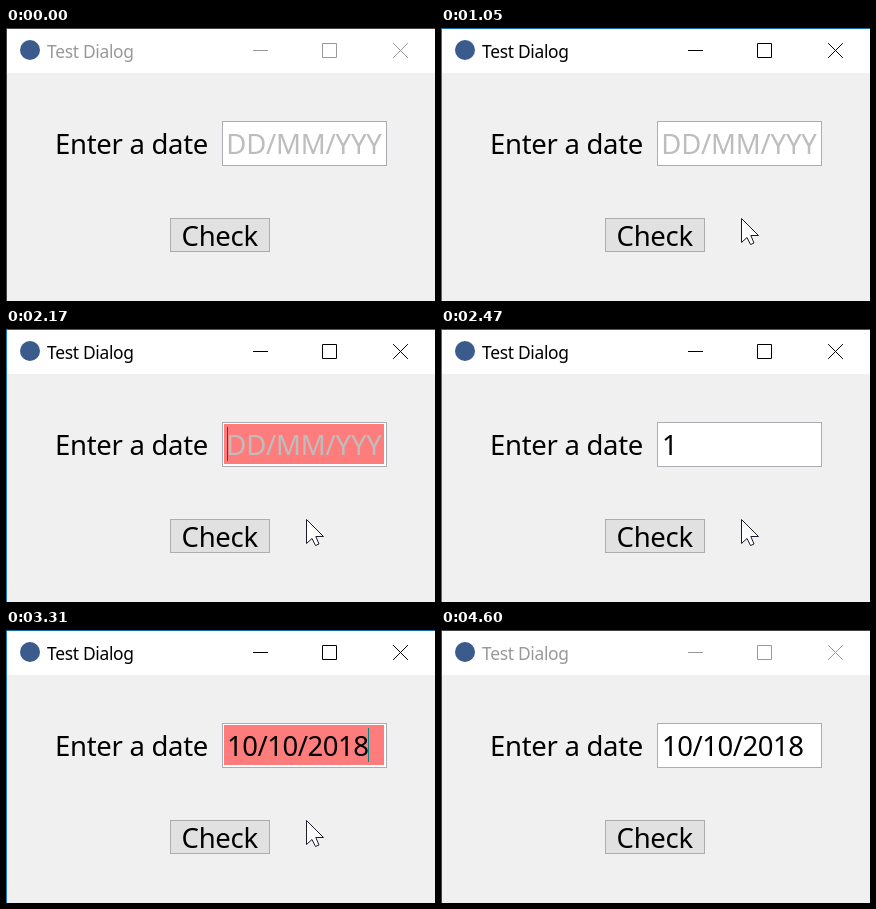
An HTML page that plays this animation: 429x273 px, repeating every 4630 ms.

```html
<!DOCTYPE html>
<html lang="en">
<head>
<meta charset="utf-8">
<title>Test Dialog</title>
<style>
  html, body { margin: 0; width: 100%; height: 100%; overflow: hidden; background: #f0f0f0; }
  svg { display: block; width: 429px; height: 273px; }
  text { font-family: "Noto Sans", "Open Sans", sans-serif; font-size: 27.5px; letter-spacing: -.3px; white-space: pre; }
  .title { font-size: 17.4px; letter-spacing: -.3px; }
  #win { --top: #444; --side: #444; --ink: #999; }
  #win.active { --top: #1766a6; --side: #1a7ac8; --ink: #000; }
  .top { fill: var(--top); }
  .side { fill: var(--side); }
  .title { fill: var(--ink); }
  .buttons { fill: none; stroke: var(--ink); }
  #hint { fill: #bdbdbd; letter-spacing: -.2px; }
  #typed { letter-spacing: -.48px; }
  #typed.word { letter-spacing: -.86px; }
</style>
</head>
<body>
<svg id="win" viewBox="0 0 429 273">
  <rect width="429" height="273" fill="#f0f0f0"/>
  <rect width="429" height="45" fill="#fff"/>
  <rect class="side" width="1" height="273"/>
  <rect class="top" width="429" height="1"/>
  <circle cx="24" cy="22" r="10" fill="#3a5b8c"/>
  <text class="title" x="41" y="30">Test Dialog</text>
  <g class="buttons">
    <path d="M247 22.5h15M316.5 15.5h14v14h-14z"/>
    <path d="M387.5 15.5l14 14M401.5 15.5l-14 14" stroke-linecap="square"/>
  </g>

  <text x="49" y="126">Enter a date</text>
  <rect x="216.5" y="93.5" width="164" height="44" fill="#fff" stroke="#abadb3"/>
  <rect id="alert" x="218" y="95" width="160" height="40" fill="#ff7c7c"/>
  <text id="hint" x="220.3" y="126">DD/MM/YYY</text>
  <text id="typed" x="221" y="126"></text>
  <rect id="caret" y="98" width="1" height="34"/>

  <rect x="164.5" y="190.5" width="99" height="33" fill="#e1e1e1" stroke="#adadad"/>
  <text x="175.6" y="218">Check</text>

  <g id="pointer">
    <path id="arrow" d="M.5 .5V24.5L6 19.5L9.5 26.5L13 25L9.8 17.5H17.5z" fill="#fff" stroke="#1c1c2c"/>
    <path id="beam" d="M-4 -11.5h3.5h1h3.5M0 -11.5v23M-4 11.5h8" fill="none" stroke="#000"/>
  </g>
</svg>
<script>
  const LOOP = 4630;
  const $ = id => document.getElementById(id);
  const [win, alertBox, hint, typed, caret, pointer, arrow, beam] =
    ["win", "alert", "hint", "typed", "caret", "pointer", "arrow", "beam"].map($);

  // Times at which a character is typed or deleted
  const WORD = "hello", DATE = "10/10/2018";
  const grow = [1120, 1190, 1260, 1330, 1400];
  const shrink = [1950, 2000, 2050, 2110, 2170];
  const dateKeys = [2470, 2500, 2610, 2750, 2830, 2900, 3050, 3130, 3210, 3310];

  // Toggle times, starting from off
  const blinks = [600, 1050, 1260, 1470, 1700, 1900, 2110, 2300, 2500, 2750,
                  2980, 3410, 3610, 3840, 4040, 4270];
  const alerts = [1150, 2200, 2500, 3340];

  // Pointer stops: time, x, y
  const path = [[130, 345, 280], [420, 265, 110], [640, 265, 110],
                [850, 300, 190], [4470, 300, 190], [4600, 330, 280]];

  const passed = (list, t) => list.filter(k => k <= t).length;
  const isOn = (list, t) => passed(list, t) % 2 === 1;
  const show = (el, on) => el.setAttribute("visibility", on ? "visible" : "hidden");

  function textAt(t) {
    const n = passed(dateKeys, t);
    return n ? DATE.slice(0, n) : WORD.slice(0, passed(grow, t) - passed(shrink, t));
  }

  function pointerAt(t) {
    const i = path.findIndex(p => p[0] > t);
    if (i < 1) return null;
    const [t0, x0, y0] = path[i - 1], [t1, x1, y1] = path[i];
    const u = (t - t0) / (t1 - t0), e = u * u * (3 - 2 * u);
    return [x0 + (x1 - x0) * e, y0 + (y1 - y0) * e];
  }

  function draw(t) {
    win.classList.toggle("active", t >= 500 && t < 4600);

    const text = textAt(t), red = isOn(alerts, t);
    if (typed.textContent !== text) typed.textContent = text;
    typed.classList.toggle("word", t < dateKeys[0]);
    show(hint, !text);
    show(alertBox, red);

    show(caret, isOn(blinks, t));
    caret.setAttribute("x", 221 + (text ? Math.floor(typed.getComputedTextLength()) : 0));
    caret.setAttribute("fill", red && text ? "#008383" : red ? "#703438" : "#000");

    const p = pointerAt(t);
    const inField = p && p[0] > 216 && p[0] < 381 && p[1] > 93 && p[1] < 138;
    show(arrow, p && !inField);
    show(beam, inField);
    if (p) pointer.setAttribute("transform", `translate(${Math.round(p[0])} ${Math.round(p[1])})`);
  }

  const start = performance.now();
  function tick() {
    draw((performance.now() - start) % LOOP);
    requestAnimationFrame(tick);
  }
  tick();
</script>
</body>
</html>
```
